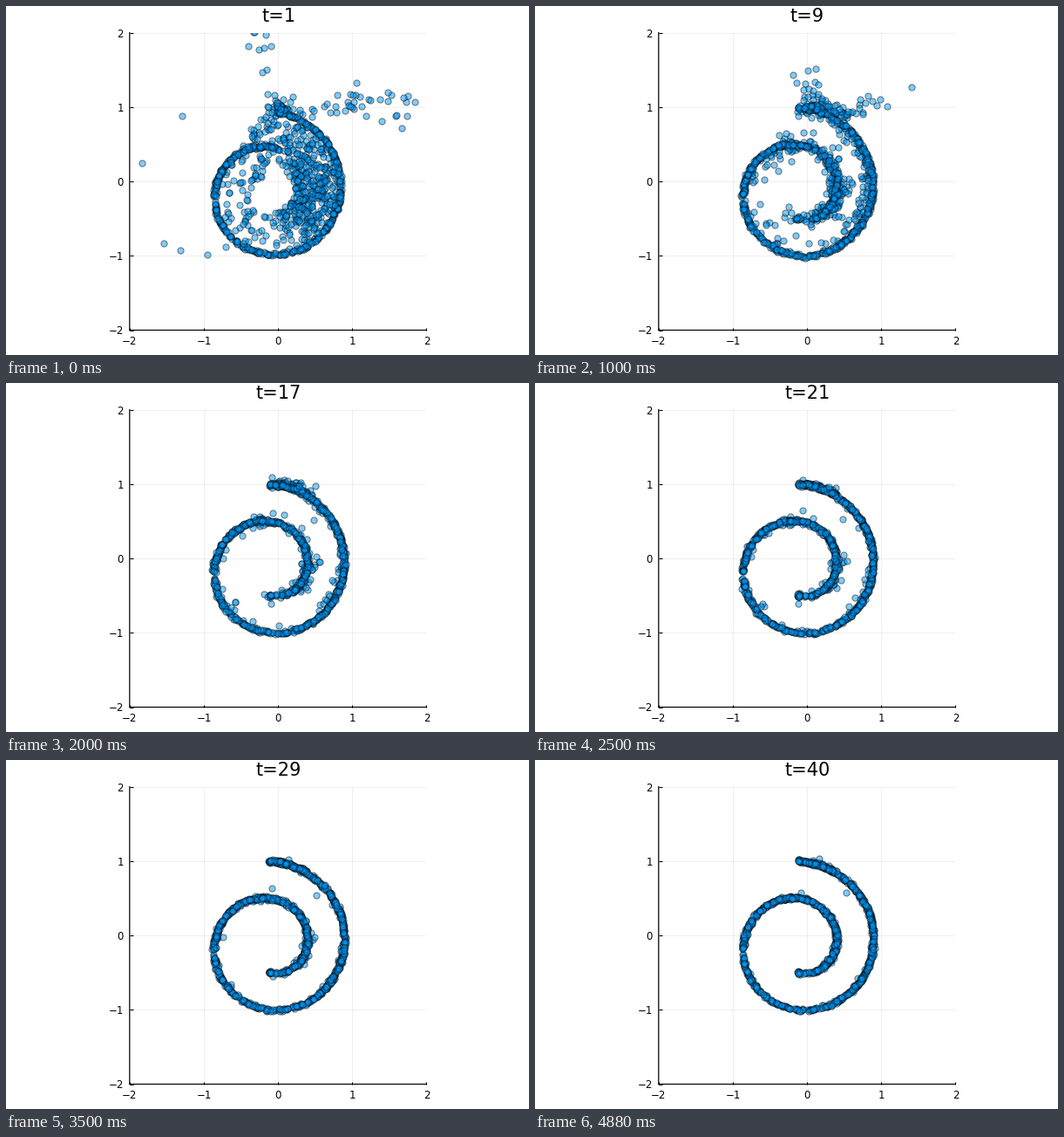
Write a matplotlib script that moves like this. It is 600 by 400 pixels and loops after 6.26 s.

```python
import numpy as np
import matplotlib.pyplot as plt
from matplotlib.animation import FuncAnimation

PX = 0.72               # one pixel in points at 100 dpi
TICK_MS, LOOP_MS, STEP_MS, LAST_STEP = 20, 6260, 125, 40
PI = np.pi
CENTRE = np.array([-.11, -.125])
rng = np.random.default_rng(7)


def polar(radius, angle):
    return np.column_stack([radius * np.cos(angle), radius * np.sin(angle)])


def spiral(turns):
    """Swiss roll; `turns` is the angle in units of pi, from 1.5 to 4.5."""
    return CENTRE + polar(turns / 4, turns * PI)


CURVE = spiral(np.linspace(1.5, 4.5, 600))


def nearest(points):
    gaps = points[:, None] - CURVE[None]
    return CURVE[(gaps ** 2).sum(axis=2).argmin(axis=1)]


def gap_cloud(count):
    """Points spread between the inner and the outer turn."""
    turns = rng.triangular(1.5, 2.05, 2.6, count)
    mix = rng.uniform(-.3, 1, count)[:, None]
    return (1 - mix) * spiral(turns) + mix * spiral(turns + 2)


def left_cloud(count):
    """Points spread inside the left and lower turn."""
    reach = np.sqrt(rng.uniform(.12, 1, count))[:, None]
    return CENTRE + (spiral(rng.uniform(2.5, 4, count)) - CENTRE) * reach


def bridge(count):
    """Loose line from the shoulder of the spiral up to its outer end."""
    along = rng.random(count)[:, None]
    line = np.array([-.45, .5]) + along * np.array([.4, .5])
    return line + rng.normal(0, .07, (count, 2))


def ray(count, angle, spread):
    """Stray offsets fanning out from the outer end."""
    return polar(rng.exponential(1.3, count), rng.normal(angle, spread, count))


cloud = np.vstack([gap_cloud(390), left_cloud(120), bridge(28),
                   rng.normal((.06, 1.02), (.1, .05), (45, 2))])
cloud_home = nearest(cloud)
cloud_life = 3 + rng.exponential(7, len(cloud))

stray_offset = np.vstack([ray(60, .14, .12), ray(28, 2, .12)])
stray_home = spiral(rng.uniform(4.35, 4.5, len(stray_offset)))

loner = polar(rng.uniform(1.1, 2.4, 9), rng.uniform(.8, 1.35, 9) * PI)
loner_home = nearest(loner)

settled = spiral(rng.uniform(2.42, 4.43, 470))
order = rng.permutation(len(cloud) + len(stray_home) + len(loner) + len(settled))


def positions(step):
    noise = np.random.default_rng(step)
    age = step - 1
    pull = np.exp(-(age / cloud_life) ** 2)[:, None]
    pivot = np.array([-.6, -.5])
    shrink = 1 - .035 * np.exp(-age / 5)

    def rest(home):
        return pivot + (home - pivot) * shrink

    wobble = noise.normal(0, .02, cloud.shape)
    points = np.vstack([
        rest(cloud_home) + (cloud - cloud_home + wobble) * pull,
        rest(stray_home) + stray_offset * np.exp(-age / 5),
        loner_home + (loner - loner_home) * np.exp(-age / 1.5),
        rest(settled),
    ])
    points += noise.normal(0, .011, points.shape)
    return points[order]


plt.rcParams["font.family"] = "DejaVu Sans"
fig = plt.figure(figsize=(6, 4), dpi=100, facecolor="white")
ax = fig.add_axes([141.8 / 600, 28.5 / 400, 340.6 / 600, 341 / 400])
ax.set(xlim=(-2, 2), ylim=(-2, 2), xticks=range(-2, 3), yticks=range(-2, 3))
ax.spines[["top", "right"]].set_visible(False)
for side in ("left", "bottom"):
    ax.spines[side].set(linewidth=1.2 * PX, snap=False)
ax.set_axisbelow(True)
ax.grid(color="black", alpha=.1, linewidth=.6 * PX)
ax.tick_params(direction="in", length=3.5 * PX, width=1.1 * PX, labelsize=8.5)
ax.tick_params(axis="x", pad=7 * PX)
ax.tick_params(axis="y", pad=7 * PX)
title = fig.text(312.5 / 600, 1 - 18 / 400, "", ha="center", va="baseline", fontsize=15)
dots, = ax.plot([], [], "o", markersize=7.2 * PX, markeredgewidth=PX,
                markerfacecolor=(0, .605, .979, .5), markeredgecolor=(0, 0, 0, .5))


def draw(index):
    step = min(LAST_STEP, (index * TICK_MS + 10) // STEP_MS + 1)
    dots.set_data(*positions(step).T)
    title.set_text(f"t={step}")
    return dots, title


anim = FuncAnimation(fig, draw, frames=LOOP_MS // TICK_MS, interval=TICK_MS,
                     repeat=True, repeat_delay=0)
plt.show()
```
